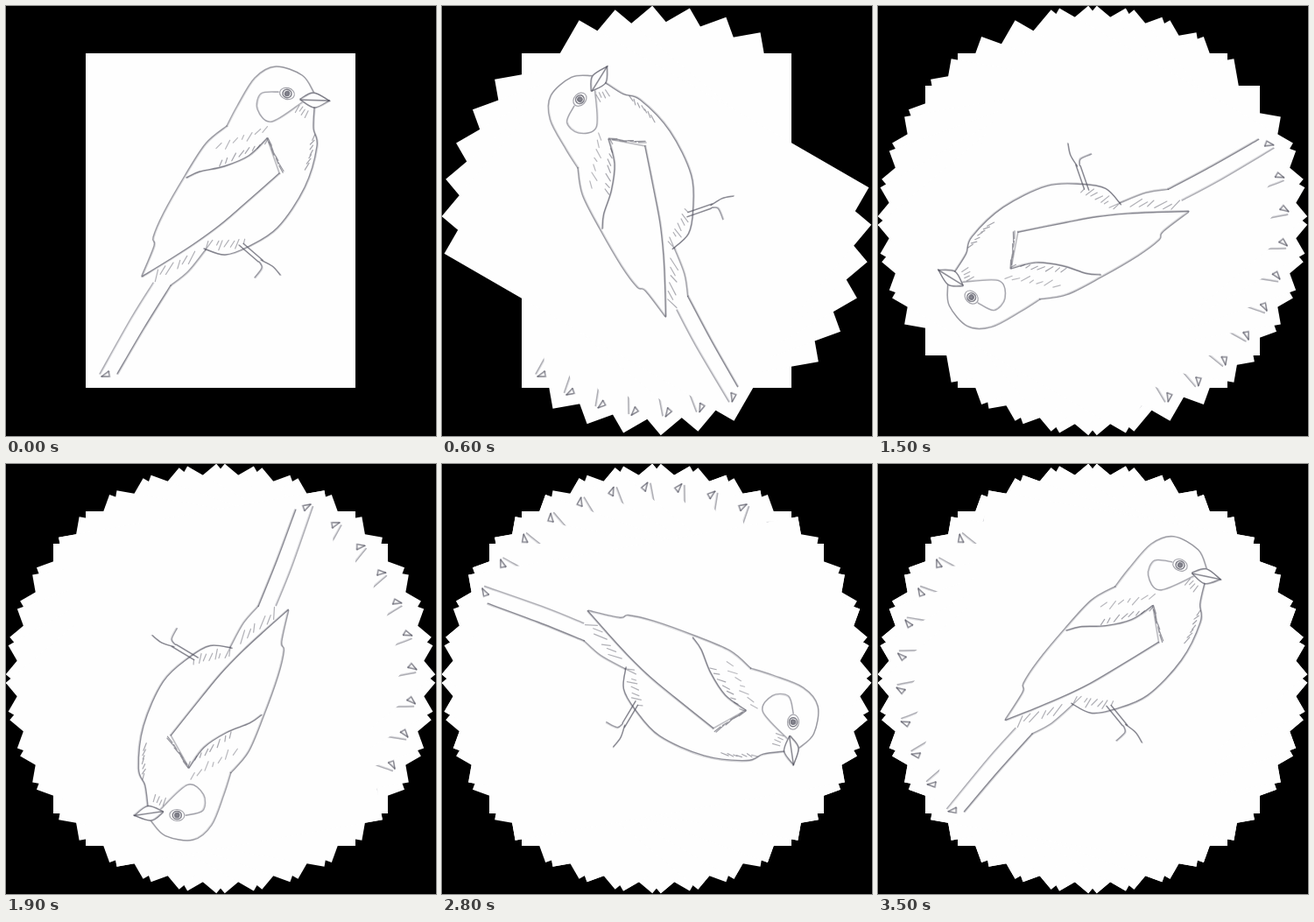
These frames come from a looping animation (491 by 491 pixels, 3.6 s). An HTML page with a canvas:

```html
<!DOCTYPE html>
<html lang="en">
<head>
<meta charset="utf-8">
<title>Turning bird sketch</title>
<style>
html, body { margin: 0; width: 100%; height: 100%; overflow: hidden; background: #000; }
canvas { display: block; width: 491px; height: 491px; }
</style>
</head>
<body>
<canvas id="stage" width="491" height="491"></canvas>
<script>
const ctx = document.getElementById('stage').getContext('2d');
const STEP_MS = 100, STEPS = 36, TURN = -Math.PI * 2 / STEPS;
const SIZE = 491, MID = 245, WIDE = 308, HIGH = 382;
const PAPER = '#fefefe', PENCIL = '#50505e';
const marks = [];

let seed = 11;
function jitter(size) {
  seed = (seed * 16807) % 2147483647;
  return (seed / 2147483647 - .5) * size;
}

function mark(alpha, width, path) {
  marks.push({ alpha, width, path });
}

// A smooth pencil line through key points, gone over twice.
function line(alpha, ...xy) {
  for (const [fade, shift] of [[1, 0], [.35, 1]]) {
    const at = i => {
      const k = 2 * Math.max(0, Math.min(i, xy.length / 2 - 1));
      return [xy[k] + shift, xy[k + 1] + shift / 2];
    };
    const path = new Path2D();
    path.moveTo(...at(0));
    for (let i = 0; i < xy.length / 2 - 1; i++) {
      const [a, b, c, d] = [at(i - 1), at(i), at(i + 1), at(i + 2)];
      path.bezierCurveTo(b[0] + (c[0] - a[0]) / 6, b[1] + (c[1] - a[1]) / 6,
        c[0] - (d[0] - b[0]) / 6, c[1] - (d[1] - b[1]) / 6, ...c);
    }
    mark(alpha * fade, 1.4, path);
  }
}

// Loose feather strokes spread from one point to another.
function feathers(alpha, count, x0, y0, x1, y1, angle, length) {
  const path = new Path2D();
  for (let i = 0; i < count; i++) {
    const k = i / (count - 1), turn = angle + jitter(.4), len = length * (.8 + jitter(.7));
    const x = x0 + (x1 - x0) * k + jitter(2), y = y0 + (y1 - y0) * k + jitter(2);
    path.moveTo(x, y);
    path.lineTo(x + Math.cos(turn) * len, y + Math.sin(turn) * len);
  }
  mark(alpha, 1.2, path);
}

function ring(alpha, width, rx, ry) {
  const path = new Path2D();
  path.ellipse(321, 100, rx, ry, .25, 0, Math.PI * 2);
  mark(alpha, width, path);
}

function sketchHead() {
  line(.5, 252, 137, 264, 114, 284, 82, 308, 69, 338, 79, 351, 98);
  line(.45, 311, 98, 291, 100, 287, 118, 303, 132, 338, 110);
  line(.65, 336, 106, 351, 99, 369, 108);
  line(.6, 369, 108, 352, 116, 336, 107);
  line(.6, 336, 107, 369, 108);
  ring(.5, 1.2, 8.5, 6.5);
  ring(.75, 1.5, 5, 4.6);
  ring(.75, 3, 1.8, 1.8);
}

function sketchBody() {
  line(.62, 352, 116, 351, 140, 355, 160, 341, 207, 310, 253, 276, 275, 250, 284, 226, 277);
  line(.55, 252, 137, 228, 157, 204, 194, 180, 236, 168, 264, 169, 274, 155, 308);
  feathers(.5, 7, 353, 148, 347, 180, 2.2, 9);
  feathers(.45, 4, 346, 120, 334, 114, 2, 9);
  feathers(.45, 8, 230, 268, 272, 267, 2, 11);
}

function sketchWing() {
  line(.65, 155, 309, 186, 290, 214, 272, 243, 251, 270, 228, 312, 191);
  line(.65, 206, 196, 221, 189, 249, 183, 277, 171, 298, 151);
  line(.35, 298, 151, 312, 191);
  feathers(.5, 8, 244, 183, 295, 158, -1.1, 9);
  feathers(.4, 7, 246, 157, 299, 138, 2.2, 11);
  feathers(.6, 9, 299, 151, 312, 182, 1.1, 11);
}

function sketchTail() {
  line(.45, 168, 316, 143, 356, 107, 420);
  line(.65, 188, 319, 158, 367, 127, 420);
  line(.5, 228, 278, 208, 303, 188, 319);
  for (const slope of [1, -1]) line(.6, 113 - slope * 4, 423, 113 + slope * 4, 420 - slope * 3);
  line(.55, 117, 417, 118, 423);
  feathers(.45, 6, 173, 302, 216, 281, 2, 14);
}

function sketchLeg() {
  for (const side of [0, 5]) line(.6, 266 + side, 273 - side / 3, 288 + side, 292 - side / 3);
  line(.6, 291, 290, 304, 297, 313, 307);
  line(.55, 289, 292, 292, 299, 284, 310);
}

function drawSheet() {
  ctx.globalAlpha = 1;
  ctx.fillStyle = PAPER;
  ctx.fillRect(MID - WIDE / 2, MID - HIGH / 2, WIDE, HIGH);
  ctx.strokeStyle = PENCIL;
  for (const m of marks) {
    ctx.globalAlpha = m.alpha;
    ctx.lineWidth = m.width;
    ctx.stroke(m.path);
  }
}

// Sheets pile up during a turn, so earlier corners stay visible.
function drawTurn(last) {
  ctx.globalAlpha = 1;
  ctx.fillStyle = '#000';
  ctx.fillRect(0, 0, SIZE, SIZE);
  for (let i = 0; i <= last; i++) {
    ctx.save();
    ctx.translate(MID, MID);
    ctx.rotate(i * TURN);
    ctx.translate(-MID, -MID);
    drawSheet();
    ctx.restore();
  }
}

sketchHead();
sketchBody();
sketchWing();
sketchTail();
sketchLeg();
ctx.lineCap = ctx.lineJoin = 'round';

let shown = -1;
function tick() {
  const step = Math.floor(performance.now() / STEP_MS) % STEPS;
  if (step !== shown) drawTurn(shown = step);
  requestAnimationFrame(tick);
}
tick();
</script>
</body>
</html>
```
